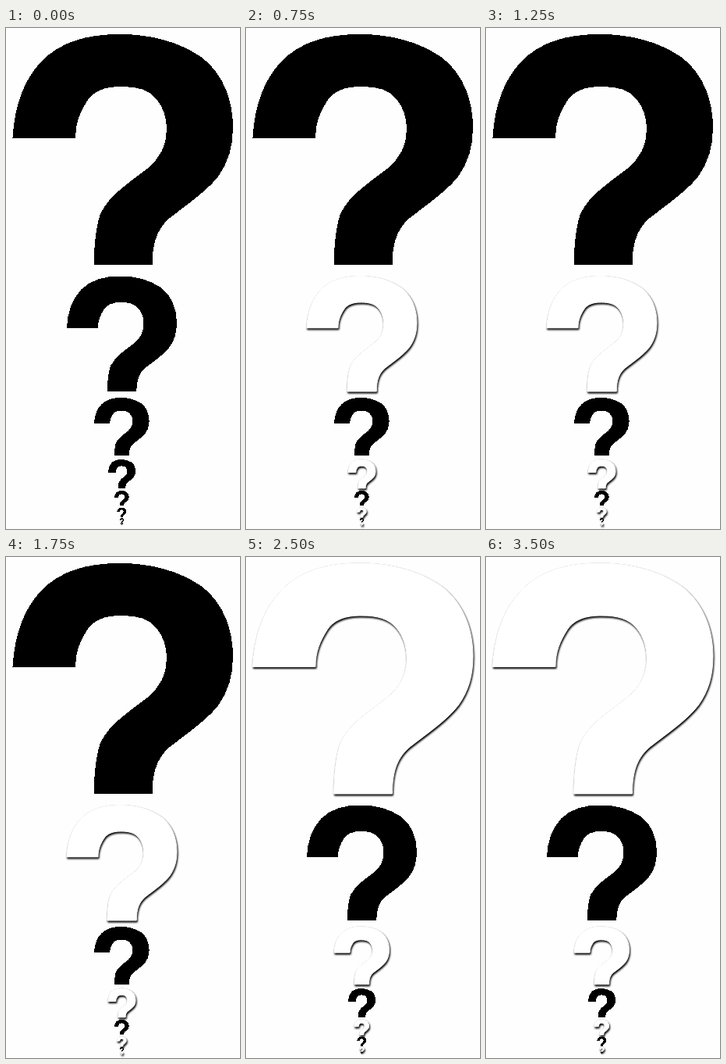
Recreate the animation shown at these times as an HTML page. Size 300 px wide and 641 px high, loop 3.75 s.

```html
<!DOCTYPE html>
<html lang="en">
<head>
<meta charset="utf-8">
<title>Question marks</title>
<style>
  html, body { margin: 0; width: 100%; height: 100%; overflow: hidden; background: #fefefe; }
  svg { display: block; width: 100%; height: 100%; }
  path { vector-effect: non-scaling-stroke; shape-rendering: crispEdges; }
  .raised {
    fill: #fff; stroke: #fff; stroke-width: 1;
    filter: drop-shadow(0 0 .3px rgba(0, 0, 0, .3)) drop-shadow(1px 2.5px 1.1px #000);
  }
  .raised path { shape-rendering: auto; }
</style>
</head>
<body>
<svg id="stage" viewBox="0 0 300 641"></svg>
<script>
const HOOK = `M8.5 140.5 C11 100 22 67 46 42 C70 18 103 8 146 8
  C187 8 222 18 250 37 C277 57 291 90 291 127 C291 152 285 172 272 190
  C258 208 236 223 210 243 C195 256 187.5 272 187.5 303 H112.5
  C113 272 117 246 122 236 C133 214 156 199 181 180
  C197 167 206 151 206 130 C206 115 202 102 193 91
  C183 79 169 75 148 75 C127 75 112 80 103 95 C95 108 89 121 89 140.5 Z`;

// Each mark: left, top and scale relative to the largest hook.
const MARKS = [
  [0, 0, 1],
  [73.5, 313.5, .5],
  [110.8, 471, .25],
  [129.7, 551, .125],
  [138.4, 591.5, .066],
  [142, 613.3, .042],
  [145.6, 627, .02],
  [146.7, 633, .011]
];

const svgNode = (name, attributes, parent) => {
  const node = document.createElementNS("http://www.w3.org/2000/svg", name);
  for (const key in attributes) node.setAttribute(key, attributes[key]);
  return parent.appendChild(node);
};

const groups = MARKS.map(([x, y, scale]) => {
  const group = svgNode("g", {}, stage);
  svgNode("path", { d: HOOK, transform: `translate(${x} ${y}) scale(${scale})` }, group);
  return group;
});

const LOOP = 3750, OPENING = 500, BEAT = 250;

function draw(now) {
  const time = now % LOOP;
  const beat = Math.floor(time / BEAT);
  groups.forEach((group, i) => {
    const raised = time >= OPENING && (i + beat) % 2 === 0;
    group.setAttribute("class", raised ? "raised" : "");
  });
}

const start = performance.now();
function tick() {
  draw(performance.now() - start);
  requestAnimationFrame(tick);
}
tick();
</script>
</body>
</html>
```
